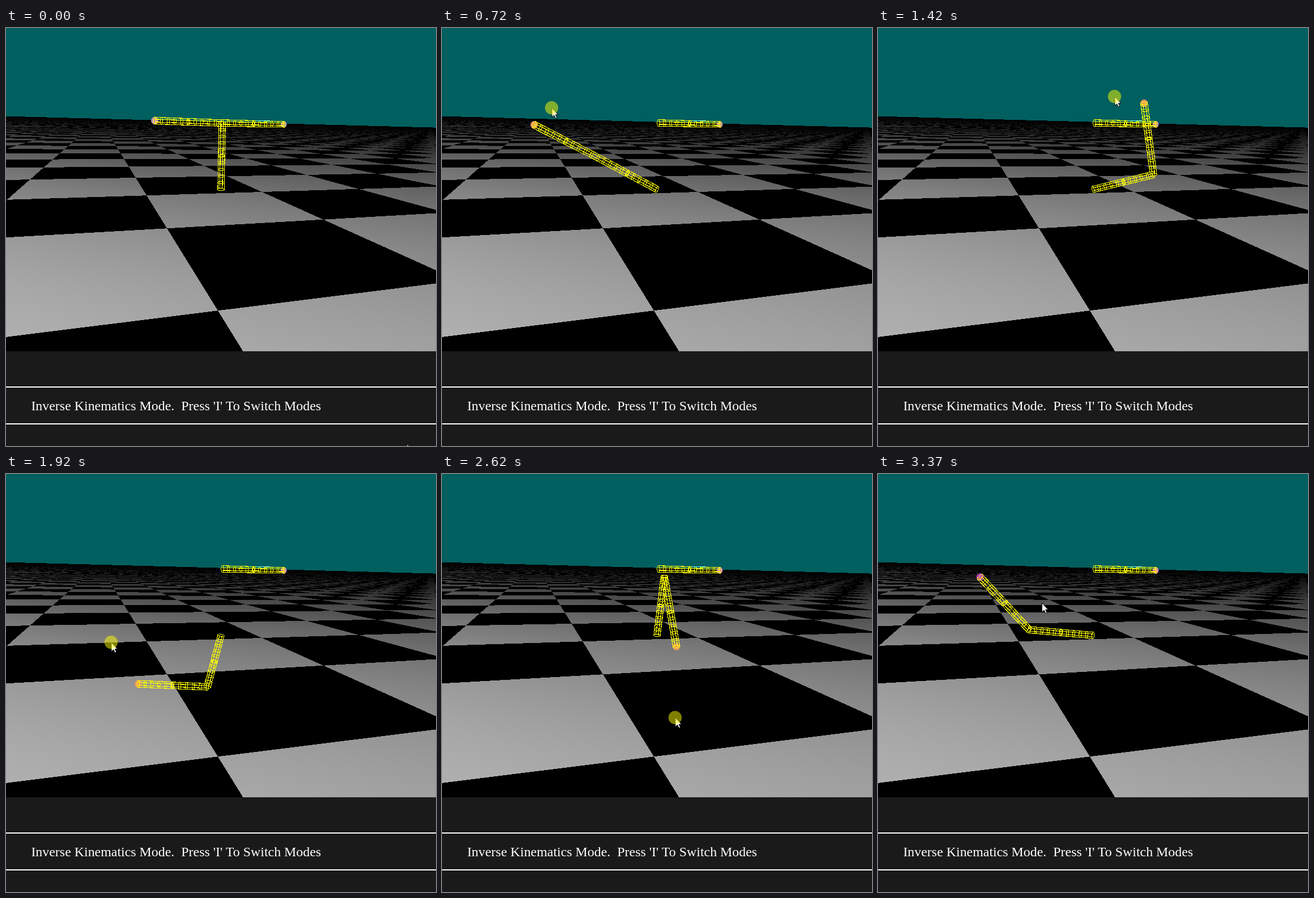
An HTML page with a canvas for the animation above (3390 ms loop, 759x737 px).

```html
<!DOCTYPE html>
<html lang="en">
<head>
<meta charset="utf-8">
<title>Inverse Kinematics</title>
<style>
html, body { margin: 0; width: 100%; height: 100%; overflow: hidden; background: #1a1a1a; }
canvas, svg { position: absolute; left: 0; top: 0; display: block; }
text { font: 23.92px "Liberation Serif", "Times New Roman", serif; fill: #fff; }
.wire { fill: none; stroke: #ff0; shape-rendering: crispEdges; }
</style>
</head>
<body>
<canvas id="floor" width="759" height="570"></canvas>
<svg width="759" height="737" viewBox="0 0 759 737">
  <path d="M0 633H759M0 698H759" stroke="#fff" stroke-width="2"/>
  <text x="44.4" y="674">Inverse Kinematics Mode.&#160; Press 'I' To Switch Modes</text>
  <circle id="farBall" cx="490" cy="170" r="5.6"/>
  <path id="farArm" class="wire"/>
  <path d="M442 163.5H466" stroke="#6ff" shape-rendering="crispEdges"/>
  <circle id="ball" r="6.5"/>
  <path id="arm" class="wire"/>
  <g id="mouse">
    <path d="M.5 .5V16.5L4.2 13L6.8 18.5L9.3 17.4L6.8 12H11.5Z" fill="#fff" stroke="#000"/>
    <circle id="press" r="11.7" fill="#ff0" fill-opacity=".5"/>
  </g>
</svg>
<script>
const LOOP = 3390, PRESS = 280, RELEASE = 3300;
const BASE = [379.5, 284.5];
const $ = id => document.getElementById(id);

// Key poses: time, then angle and length of each half of the arm
const POSE = [
  [PRESS, -89, 117, -178, 119],
  [560, -218, 100, -143, 124],
  [720, -152, 118, -152.8, 127],
  [1420, -14, 110, -97.7, 127],
  [1920, 464, 94, 182, 122],
  [2360, 862, 104, 378, 126],
  [2900, 1116, 105, 497.6, 125],
  [3260, 1265, 113, 587, 127]
];

// The mouse circles clockwise on an ellipse: time, angle, size
const ORBIT = [
  [PRESS, -125.6, .9],
  [500, -178, .95],
  [720, -135.3, 1.25],
  [1420, -74, 1.05],
  [1920, 173, .935],
  [2360, 407.3, .955],
  [2900, 461.2, 1],
  [3260, 581, .51]
];

// Hermite curve whose tangents vanish at turning points
function sample(keys, t) {
  const last = keys.length - 1;
  let i = 0;
  while (i < last - 1 && keys[i + 1][0] <= t) i++;
  const a = keys[i], b = keys[i + 1], span = b[0] - a[0];
  const s = Math.max(0, Math.min(1, (t - a[0]) / span));
  const rate = (j, c) => (keys[j + 1][c] - keys[j][c]) / (keys[j + 1][0] - keys[j][0]);
  const slope = (j, c) => {
    if (j < 1 || j >= last) return 0;
    const l = rate(j - 1, c), r = rate(j, c);
    return l * r <= 0 ? 0 : 2 * l * r / (l + r);
  };
  return a.slice(1).map((v, k) => {
    const c = k + 1, d = b[c] - v;
    const m0 = slope(i, c) * span, m1 = slope(i + 1, c) * span;
    return v + s * (m0 + s * (3 * d - 2 * m0 - m1 + s * (m0 + m1 - 2 * d)));
  });
}

// Checkerboard in perspective: each pixel is mapped back to the ground plane
function paintFloor() {
  const w = 759, h = 570, ctx = $("floor").getContext("2d");
  const img = ctx.createImageData(w, h);
  const ax = 164.4, ay = 159.9, bx = 2580, by = 223.8;
  for (let y = 0, p = 0; y < h; y++) {
    for (let x = 0; x < w; x++, p += 4) {
      const px = x + .5, py = y + .5, drop = py - 155.6 - .0264 * px;
      let rgb = [0, 95, 95];
      if (drop > 0) {
        const det = (ax - px) * (by - py) - (bx - px) * (ay - py);
        const ex = px - 374, ey = py - 498.3;
        const v = (ex * (by - py) - ey * (bx - px)) / det / .75;
        const u = ((ax - px) * ey - (ay - py) * ex) / det / .239;
        const light = (Math.floor(u) + Math.floor(v)) & 1;
        rgb.fill(light * 212 * drop / (drop + 80 + .06 * px));
      }
      img.data.set(rgb, p);
      img.data[p + 3] = 255;
    }
  }
  ctx.putImageData(img, 0, 0);
}

const fmt = n => n.toFixed(1);

// Eight-sided wireframe cylinder from p to q
function tube(p, q, r0, r1) {
  const dx = q[0] - p[0], dy = q[1] - p[1], len = Math.hypot(dx, dy);
  const nx = -dy / len, ny = dx / len;
  const turn = fmt(Math.atan2(ny, nx) * 180 / Math.PI);
  const at = (f, o) => {
    const r = (r0 + (r1 - r0) * f) * o;
    return fmt(p[0] + dx * f + nx * r) + " " + fmt(p[1] + dy * f + ny * r);
  };
  let d = "";
  const ring = f => {
    const r = r0 + (r1 - r0) * f;
    const arc = `A${fmt(r)} ${fmt(r * .35)} ${turn} 0 1 `;
    d += "M" + at(f, 1) + arc + at(f, -1) + arc + at(f, 1);
  };
  for (let i = 0; i <= 10; i++) ring(i / 10);
  ring(.5 + 1.2 / len);
  for (let k = 0; k < 8; k++) {
    const o = Math.cos((k + .47) * Math.PI / 4);
    d += "M" + at(0, o) + "L" + at(1, o);
  }
  return d;
}

function polar(p, deg, rx, ry = rx) {
  const a = deg * Math.PI / 180;
  return [p[0] + rx * Math.cos(a), p[1] + ry * Math.sin(a)];
}

function mouseAt(t) {
  const [angle, size] = sample(ORBIT, t);
  const [x, y] = polar([362, 280], angle, 190 * size, 158 * size);
  const away = Math.max(0, 1 - t / PRESS);
  return [x + (709 - x) * away, y + (735 - y) * away];
}

function draw(t) {
  const [a1, l1, a2, l2] = sample(POSE, t);
  const elbow = polar(BASE, a1, l1), hand = polar(elbow, a2, l2);
  const held = t >= PRESS && t < RELEASE;
  $("arm").setAttribute("d", tube(BASE, elbow, 6, 6.2) + tube(elbow, hand, 6.2, 6.5));
  $("ball").setAttribute("cx", hand[0]);
  $("ball").setAttribute("cy", hand[1]);
  $("ball").setAttribute("fill", held ? "#e89a60" : t < PRESS ? "#c090b4" : "#b840b8");
  $("farBall").setAttribute("fill", `hsl(308 ${fmt(18 + t / 100)}% 62%)`);
  $("mouse").setAttribute("transform", `translate(${mouseAt(t).map(fmt)})`);
  $("press").setAttribute("visibility", held ? "visible" : "hidden");
}

paintFloor();
$("farArm").setAttribute("d", tube([382, 167.5], [491, 170], 6.2, 5.4));
const start = performance.now();
function tick(now) {
  draw(Math.max(0, now - start) % LOOP);
  requestAnimationFrame(tick);
}
draw(0);
requestAnimationFrame(tick);
</script>
</body>
</html>
```
